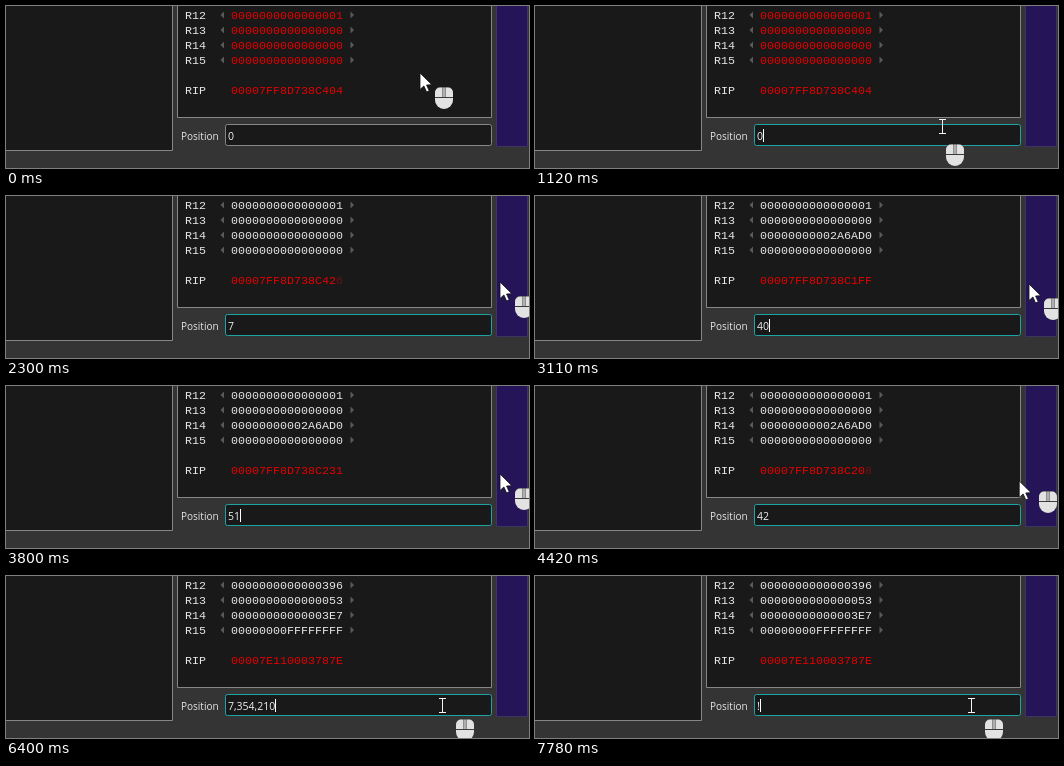
Recreate the animation shown at these times as an HTML page with a canvas. Size 523 px wide and 162 px high, loop 8000 ms.

```html
<!DOCTYPE html>
<html lang="en">
<head>
<meta charset="utf-8">
<title>Trace position</title>
<style>
  html, body { margin: 0; width: 523px; height: 162px; overflow: hidden; background: #343434; }
  canvas { display: block; }
</style>
</head>
<body>
<canvas id="stage" width="523" height="162"></canvas>
<script>
const ctx = document.getElementById('stage').getContext('2d');
const LOOP = 8000, TICK = 62;
const MONO = '11.667px "Liberation Mono", monospace';
const SANS = '"Open Sans", "Noto Sans", sans-serif';
const RED = '#e60000', DIM_RED = '#701010', WHITE = '#e6e6e6';
const DARK = '#191919', BORDER = '#86868a', TEAL = '#1ca4a6';

const within = (t, from, to) => t >= from && t < to;
const ramp = (t, from, to) => Math.min(1, Math.max(0, (t - from) / (to - from)));
const easeOut = k => 1 - (1 - k) ** 1.7;
const hex = n => n.toString(16).toUpperCase().padStart(16, '0');

function pointerAt(t) {
  let x = 414, y = 67;
  const glide = (from, to, toX, toY) => {
    const k = easeOut(ramp(t, from, to));
    x += (toX - x) * k;
    y += (toY - y) * k;
  };
  glide(0, 150, 385, 129.5);
  glide(1060, 1520, 494, 86);
  glide(2550, 2640, 494, 88);
  glide(4350, 4860, 435.5, 129.5);
  return [x, y];
}

function positionAt(t) {
  const typed = 7 * ramp(t, 1740, 2100);
  const forward = 45 * easeOut(ramp(t, 2550, 3550));
  const back = 10 * ramp(t, 3740, 4150);
  return Math.round(typed + forward - back);
}

function rect(x, y, w, h, color) {
  ctx.fillStyle = color;
  ctx.fillRect(x, y, w, h);
}

function rounded(x, y, w, h, radii, color) {
  ctx.beginPath();
  ctx.roundRect(x, y, w, h, radii);
  ctx.fillStyle = color;
  ctx.fill();
}

function panel(x, y, w, h, fill, border, radius = 0) {
  rounded(x + 0.5, y + 0.5, w - 1, h - 1, radius, fill);
  ctx.lineWidth = 1;
  ctx.strokeStyle = border;
  ctx.stroke();
}

function polygon(points, color) {
  ctx.beginPath();
  points.forEach(([x, y]) => ctx.lineTo(x, y));
  ctx.closePath();
  ctx.fillStyle = color;
  ctx.fill();
}

function text(str, x, y, font, color) {
  ctx.font = font;
  ctx.fillStyle = color;
  ctx.fillText(str, x, y);
}

function drawFrame() {
  rect(0, 0, 523, 162, '#343434');
  panel(-2, -2, 169, 147, DARK, BORDER);
  panel(171, -2, 315, 114, DARK, BORDER);
  panel(490, -2, 32, 143, '#251458', '#3c3560');
}

function drawStepArrow(x, y, direction) {
  polygon([[x, y - 3.5], [x, y + 3.5], [x + direction * 3.5, y]], '#5a5a5a');
}

function drawRegisters(t, position) {
  const jumped = t >= 6400;
  const values = jumped ? [0x396, 0x53, 0x3E7, 0xFFFFFFFF]
                        : [1, 0, position >= 24 ? 0x2A6AD0 : 0, 0];
  values.forEach((value, i) => {
    const y = 13 + i * 15;
    const fresh = t < 1800 || (i === 2 && within(position, 24, 28));
    text('R' + (12 + i), 179, y, MONO, WHITE);
    text(hex(value), 225, y, MONO, fresh ? RED : WHITE);
    drawStepArrow(218, y - 4, -1);
    drawStepArrow(344.5, y - 4, 1);
  });

  const traced = position < 20
    ? 0x7FF8D738C404 + Math.round(position * 34 / 7)
    : 0x7FF8D738C1FF + Math.round((position - 40) * 4.5);
  const address = hex(jumped ? 0x7E110003787E : traced);
  const faded = within(t, 2110, 2610) || within(t, 4170, 6400);
  text('RIP', 179, 88, MONO, WHITE);
  text(address.slice(0, 15), 225, 88, MONO, RED);
  text(address[15], 330, 88, MONO, faded ? DIM_RED : RED);
}

function fieldText(t, position) {
  if (t >= 7780) return '!';
  if (t >= 6400) return '7,354,210';
  if (t >= 6210) return '!50';
  if (t >= 6080) return '!5';
  if (t >= 5710) return '!';
  return String(position);
}

function drawField(t, position) {
  const content = fieldText(t, position);
  text('Position', 175, 134, '10px ' + SANS, WHITE);
  panel(219, 118, 267, 22, DARK, t >= 120 ? TEAL : BORDER, 2);
  ctx.font = '10.5px ' + SANS;
  const end = Math.round(222 + ctx.measureText(content).width);
  const selected = within(t, 5170, 5710) || within(t, 7330, 7780);
  if (selected) rect(221, 123, end - 221, 13, '#147c86');
  text(content, 222, 134, ctx.font, '#f0f0f0');
  const caret = within(t, 740, 1270) || within(t, 1800, 2300) || within(t, 2610, 4170) ||
    within(t, 4850, 6710) || t >= 7270;
  if (caret) rect(end, 123, 1, 13, '#ffffff');
}

function drawArrow(x, y) {
  ctx.save();
  ctx.translate(x, y);
  polygon([[0, 0], [0, 16.5], [3.9, 13], [6.6, 19], [9.2, 17.8], [6.6, 12], [11.8, 11.7]], '#ffffff');
  ctx.lineWidth = 0.8;
  ctx.strokeStyle = '#111111';
  ctx.stroke();
  ctx.restore();
}

function drawBeam(x, y) {
  const cx = Math.round(x), top = Math.round(y - 7.5);
  rect(cx, top, 1, 15, '#f4f4f4');
  for (const row of [top, top + 14]) {
    rect(cx - 3, row, 3, 1, '#f4f4f4');
    rect(cx + 1, row, 3, 1, '#f4f4f4');
  }
}

function drawMouse(x, y, pressed) {
  const light = '#e2e2e2';
  ctx.save();
  ctx.translate(Math.round(x), Math.round(y));
  rounded(0, 0, 18, 22, [5, 5, 9, 9], '#3a3a3a');
  rounded(0, 0.5, 7.5, 9.5, [5, 0, 0, 0], pressed ? '#e01010' : light);
  rounded(8.3, 0.5, 1.4, 9.5, 0, light);
  rounded(10.5, 0.5, 7.5, 9.5, [0, 5, 0, 0], light);
  rounded(0, 11, 18, 11, [0, 0, 9, 9], light);
  ctx.restore();
}

function drawPointer(t, frameTime) {
  const [x, y] = pointerAt(frameTime);
  const [trailX, trailY] = pointerAt(frameTime - 27);
  const pressed = within(t, 740, 870) || within(t, 4900, 5030);
  if (pressed) {
    ctx.beginPath();
    ctx.arc(x - 2, y - 0.5, 11.5, 0, Math.PI * 2);
    ctx.fillStyle = 'rgba(212, 202, 10, 0.68)';
    ctx.fill();
  }
  drawMouse(trailX + 14.5, trailY + 13.5, pressed);
  if (within(x, 219, 486) && within(y, 118, 140)) drawBeam(x, y);
  else drawArrow(x, y);
}

function render(now) {
  const t = now % LOOP;
  const frameTime = Math.floor(t / TICK) * TICK;
  const position = positionAt(frameTime);
  drawFrame();
  drawRegisters(t, position);
  drawField(t, position);
  drawPointer(t, frameTime);
}

const start = performance.now();
function tick() {
  render(performance.now() - start);
  requestAnimationFrame(tick);
}
tick();
</script>
</body>
</html>
```
